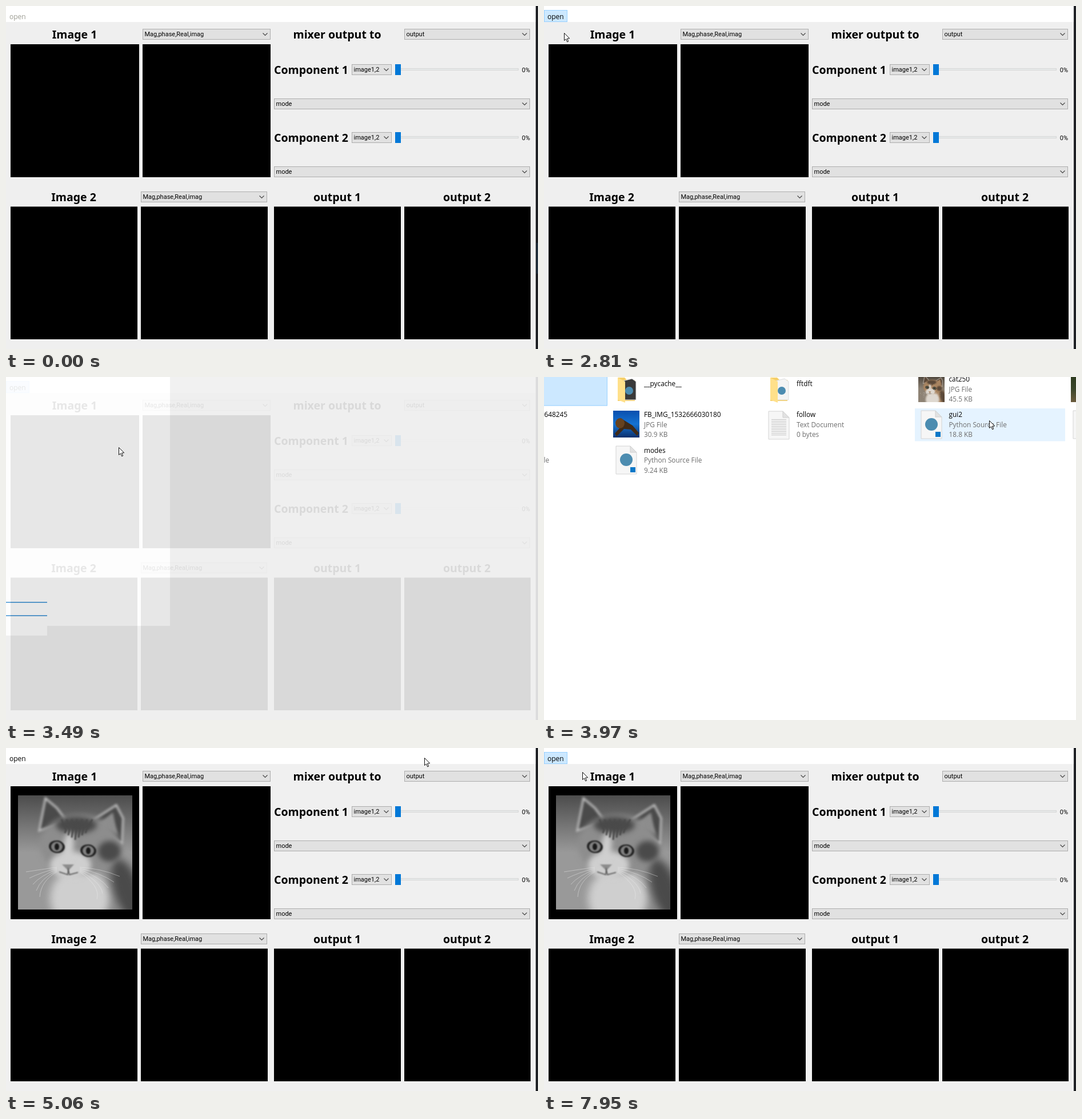
An HTML page with a canvas for the animation above (8000 ms loop, 931x601 px).

```html
<!DOCTYPE html>
<html lang="en">
<head>
<meta charset="utf-8">
<title>Image mixer</title>
<style>
html, body { margin: 0; width: 100%; height: 100%; overflow: hidden; background: #f0f0f0; }
canvas { display: block; }
</style>
</head>
<body>
<canvas id="stage" width="931" height="601"></canvas>
<script>
const W = 931, H = 601, LOOP = 8000;
const main = document.getElementById('stage').getContext('2d');
let c = main;

const SMALL = '11px Roboto, sans-serif';
const BOLD = 'bold 19.5px "Noto Sans", sans-serif';
const MENU = '12px "Open Sans", sans-serif';
const FILES = '11.8px "Open Sans", sans-serif';

// Pointer moves: start, end, number of jumps, place reached
const moves = [
  [70, 260, 3, 417, 439], [520, 1050, 9, 8, 35], [1250, 1330, 2, 22, 20],
  [1870, 2270, 5, 30, 40], [2470, 2470, 1, 33, 45], [2610, 2810, 3, 35, 47],
  [3360, 3490, 3, 197, 123], [3560, 3560, 1, 243, 180], [3640, 3970, 5, 779, 76],
  [4040, 4110, 2, 708, 29], [4180, 4310, 3, 732, 17],
  [5270, 5390, 3, 153, 205], [5660, 6110, 7, 33, 37], [6260, 6350, 2, 25, 20],
  [7000, 7480, 7, 30, 53], [7690, 7690, 1, 42, 55], [7880, 7950, 2, 67, 42]
];

function pointerAt(t) {
  let x = 996, y = 665;
  for (const [start, end, n, tx, ty] of moves) {
    if (t < start) break;
    const gap = (end - start) / (n - 1 || 1);
    const done = t >= end ? 1 : (Math.floor((t - start) / gap) + 1) / n;
    x += (tx - x) * done;
    y += (ty - y) * done;
  }
  return [Math.round(x), Math.round(y)];
}

function box(x, y, w, h, fill, line) {
  c.fillStyle = fill;
  c.fillRect(x, y, w, h);
  if (line) {
    c.strokeStyle = line;
    c.lineWidth = 1;
    c.strokeRect(x + .5, y + .5, w - 1, h - 1);
  }
}

function text(s, x, y, font, fill = '#000', align = 'left') {
  c.font = font;
  c.fillStyle = fill;
  c.textAlign = align;
  c.fillText(s, x, y);
}

function poly(points, fill, line, width = 1) {
  c.beginPath();
  points.forEach(([x, y]) => c.lineTo(x, y));
  if (fill) { c.closePath(); c.fillStyle = fill; c.fill(); }
  if (line) { c.strokeStyle = line; c.lineWidth = width; c.stroke(); }
}

function oval(x, y, rx, ry, fill, turn = 0) {
  c.beginPath();
  c.ellipse(x, y, rx, ry, turn, 0, 7);
  c.fillStyle = fill;
  c.fill();
}

function shade(x, y, h, ...stops) {
  const g = c.createLinearGradient(x, y, x, y + h);
  stops.forEach((s, i) => g.addColorStop(i / (stops.length - 1), s));
  return g;
}

// Soft stand-in for the cat photograph, on a 200 x 200 square
function makeCat(top, low, fur, light, dark, eye) {
  const keep = c, sheet = document.createElement('canvas');
  sheet.width = sheet.height = 200;
  c = sheet.getContext('2d');
  box(0, 0, 200, 200, shade(0, 0, 200, top, low, low));
  c.filter = 'blur(7px)';
  oval(140, 172, 72, 72, fur);
  oval(108, 180, 52, 54, light);
  oval(190, 165, 22, 55, dark, -.3);
  c.filter = 'blur(2px)';
  poly([[48, 5], [37, 62], [86, 46], [68, 22]], dark, light, 3);
  poly([[172, 17], [124, 48], [182, 84], [184, 40]], dark, light, 3);
  poly([[166, 30], [140, 50], [174, 68]], fur);
  c.filter = 'blur(5px)';
  oval(108, 86, 70, 52, fur);
  oval(102, 52, 36, 15, dark);
  oval(160, 98, 20, 18, dark);
  oval(92, 122, 36, 24, light);
  oval(88, 92, 9, 28, light, .1);
  c.filter = 'blur(1px)';
  for (let i = 0; i < 7; i++)
    poly([[76 + i * 9, 42], [84 + i * 6, 60], [82 + i * 6, 78 - Math.abs(i - 3) * 4]], null, dark, 3);
  for (const [x, y] of [[68, 90], [123, 97]]) {
    oval(x, y, 14, 11, '#222', .15);
    oval(x, y, 10, 9, eye);
    oval(x, y, 4, 6, '#181818');
  }
  poly([[77, 121], [98, 121], [88, 132]], fur);
  poly([[72, 134], [87, 139], [88, 130], [90, 139], [105, 135]], null, dark, 1.5);
  c.filter = 'none';
  c.globalAlpha = .55;
  for (let i = 0; i < 5; i++) {
    c.beginPath();
    c.moveTo(108, 126 + i * 2);
    c.quadraticCurveTo(145, 128 + i * 8, 178 - i * 10, 142 + i * 10);
    c.moveTo(68, 126 + i * 2);
    c.quadraticCurveTo(40, 130 + i * 5, 14 + i * 6, 134 + i * 11);
    c.strokeStyle = '#eee';
    c.lineWidth = .8;
    c.stroke();
  }
  c = keep;
  return sheet;
}

const greyCat = makeCat('#4c4c4c', '#999', '#8d8d8d', '#cfcfcf', '#4a4a4a', '#808080');
const warmCat = makeCat('#4a4238', '#8d8274', '#a98561', '#ded8d0', '#5b4939', '#77755c');

function combo(x, y, w, label) {
  box(x, y, w, 19, '#e1e1e1', '#adadad');
  text(label, x + 3.5, y + 13, SMALL);
  const r = x + w - 9.5;
  poly([[r - 4, y + 7.5], [r, y + 11.5], [r + 4, y + 7.5]], null, '#444', 1.1);
}

function component(y, label) {
  text(label, 469, y + 7, BOLD);
  combo(605, y - 10, 70, 'image1,2');
  box(686, y - 3, 211, 4, '#e7eaea', '#d6d6d6');
  box(681, y - 10, 10, 19, '#0078d7');
  text('0%', 917, y + 4, SMALL, '#000', 'right');
  combo(469, y + 50, 448, 'mode');
}

function app(t) {
  box(0, 0, W, H, t < 4990 ? '#efefef' : '#f0f0f0');
  box(0, 0, 927, 28, '#fff');
  box(927, 0, 4, H, '#202226');
  if (t < 1600) box(928, 415, 3, 54, '#243340');

  const pressed = t >= 1600 && t < 4990 || t >= 6810;
  const hover = t >= 1250 && t < 1600 || t >= 6260 && t < 6810;
  if (pressed) box(0, 7, 41, 21, '#cce8ff', '#99d1ff');
  if (hover) box(0, 7, 41, 21, '#e5f3ff', '#cce8ff');
  text('open', 6, 22.5, MENU, t < 1250 ? '#9c9c92' : '#000');

  text('Image 1', 120, 57, BOLD, '#000', 'center');
  text('mixer output to', 579.5, 57, BOLD, '#000', 'center');
  text('Image 2', 118.5, 341.5, BOLD, '#000', 'center');
  text('output 1', 579.5, 341.5, BOLD, '#000', 'center');
  text('output 2', 806.5, 341.5, BOLD, '#000', 'center');
  combo(239, 40, 224, 'Mag,phase,Real,imag');
  combo(697, 40, 220, 'output');
  combo(236, 325, 221, 'Mag,phase,Real,imag');
  component(112, 'Component 1');
  component(231, 'Component 2');

  box(8, 67, 225, 233, '#000');
  box(239, 67, 224, 233, '#000');
  for (const [x, w] of [[8, 222], [236, 222], [469, 222], [697, 221]])
    box(x, 351.5, w, 232.5, '#000');
  if (t >= 4990) c.drawImage(greyCat, 21, 83);
}

function menu(t, [, py]) {
  const start = t < 4000 ? 1600 : 6810;
  const end = t < 4000 ? 2470 : 7880;
  if (t < start || t >= end) return;
  c.globalAlpha = Math.min(1, .35 + (t - start) / 300);
  box(0, 28, 155, 47, '#f2f2f2', '#ccc');
  ['Image 1', 'Image 2'].forEach((label, i) => {
    const y = 30 + i * 22;
    if (py >= y && py < y + 22) box(3, y, 149, 22, '#91c9f7');
    text(label, 32, y + 15, MENU);
  });
  c.globalAlpha = 1;
}

function page(x, y) {
  poly([[x, y], [x + 25, y], [x + 36, y + 11], [x + 36, y + 49], [x, y + 49], [x, y]], '#f6f6f6', '#d4d4d4');
  poly([[x + 25, y], [x + 25, y + 11], [x + 36, y + 11]], '#e2e2e2', '#cfcfcf');
}

function script(x, y) {
  page(x, y);
  oval(x + 18, y + 24, 11, 11, '#4c8cb0');
  box(x + 25, y + 37, 9, 9, '#0a78c8');
}

function folder(x, tone) {
  poly([[x, 1], [x + 12, 1], [x + 16, 5], [x + 30, 5], [x + 30, 42], [x, 42]], '#f5cf69');
  poly([[x + 9, 7], [x + 25, 3], [x + 32, 8], [x + 32, 40], [x + 9, 40]], tone, '#ddd');
  oval(x + 20, 24, 7, 7, '#4c8cb0');
  poly([[x, 1], [x + 13, 8], [x + 13, 45], [x, 40]], '#ffe08a');
}

function details(x, y, ...lines) {
  lines.forEach((s, i) => text(s, x, y + i * 17.6, FILES, i ? '#6d6d6d' : '#000'));
}

// Cells with a file in them, as column,row
const cells = ['0,0', '1,0', '2,0', '3,0', '0,1', '1,1', '2,1', '3,1', '0,2', '1,2'];

function dialog(t, [px, py]) {
  box(0, 0, W, H, '#fff');
  const cell = (col, row, fill, line) => box(-152 + col * 267, -7 + row * 62, 263, 57.5, fill, line);
  const col = Math.floor((px + 152) / 267), row = Math.floor((py + 7) / 62);
  if (cells.includes(col + ',' + row)) cell(col, row, '#e5f3ff');
  cell(t < 4580 ? 0 : 3, 0, '#cce8ff', '#99d1ff');

  text('3648245', 41, 70, FILES, '#000', 'right');
  text('Python Source File', 9, 150, FILES, '#6d6d6d', 'right');

  folder(129, '#3a3a3a');
  details(175, 16, '__pycache__');
  box(121, 59, 46, 47, shade(121, 59, 47, '#0a4fae', '#1573d2', '#0a2f6b'));
  poly([[125, 80], [134, 72], [142, 77], [155, 85], [166, 98], [163, 103], [152, 92],
        [140, 91], [127, 104], [124, 99], [132, 90]], '#3f2a17');
  oval(133, 81, 8, 9, '#66421f');
  details(175, 70, 'FB_IMG_1532666030180', 'JPG File', '30.9 KB');
  script(126, 121);
  details(175, 132.5, 'modes', 'Python Source File', '9.24 KB');

  folder(396, '#f4f4f4');
  details(442, 16, 'fftdft');
  page(393, 60);
  for (let y = 74; y < 103; y += 3) box(398, y, 26, 1, '#c4c4c4');
  details(442, 70, 'follow', 'Text Document', '0 bytes');

  c.drawImage(warmCat, 655, -3, 46, 47);
  details(708.5, 8, 'cat250', 'JPG File', '45.5 KB');
  script(660, 59);
  details(708.5, 70, 'gui2', 'Python Source File', '18.8 KB');

  box(922, -3, 9, 47, shade(922, -3, 47, '#2c3a1e', '#39452a', '#6b5b3c'));
  page(926, 59);
}

// The dialog's empty panes, seen while it fades in
function blankDialog(full) {
  box(0, 0, W, H, '#f0f0f0');
  box(0, 0, 287, 436, '#fff');
  box(0, 436, 72, 17, '#fff');
  if (full) {
    box(0, 394, 72, 1.5, '#2f8ad2');
    box(0, 417.5, 72, 1.5, '#2f8ad2');
  }
}

// Layers that fade are drawn apart, then laid over the stage
const layer = document.createElement('canvas');
layer.width = W;
layer.height = H;

function fade(alpha, paint) {
  c = layer.getContext('2d');
  paint();
  c = main;
  c.globalAlpha = alpha;
  c.drawImage(layer, 0, 0);
  c.globalAlpha = 1;
}

function arrow([x, y]) {
  c.save();
  c.translate(x + .5, y + .5);
  c.lineJoin = 'round';
  poly([[0, 0], [0, 13], [3, 10.4], [5.2, 15.4], [7.2, 14.5], [5, 9.6], [9.2, 9.3], [0, 0]], '#fff', '#111');
  c.restore();
}

function draw(t) {
  const tip = pointerAt(t);
  if (t >= 3560 && t < 4990) {
    dialog(t, tip);
  } else {
    app(t);
    menu(t, tip);
    if (t >= 3360 && t < 3560)
      fade(t < 3425 ? .4 : t < 3490 ? .7 : .906, () => blankDialog(t >= 3490));
    if (t >= 4990 && t < 5060) fade(.3, () => dialog(t, tip));
  }
  arrow(tip);
}

const begin = performance.now();
function tick() {
  draw((performance.now() - begin) % LOOP);
  requestAnimationFrame(tick);
}
tick();
</script>
</body>
</html>
```
